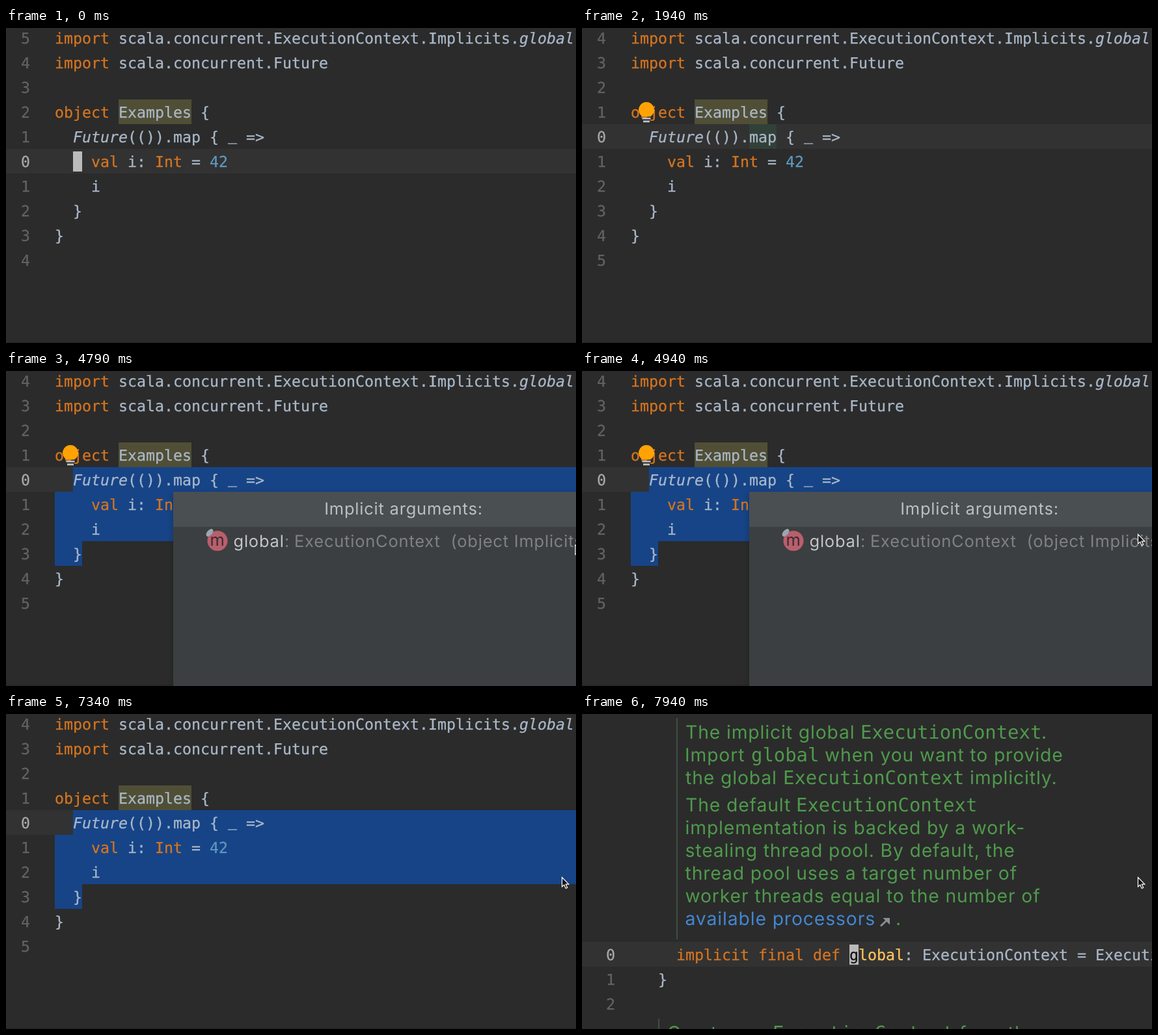
An HTML page that plays this animation: 876 px wide and 485 px high, repeating every 8000 ms.

```html
<!DOCTYPE html>
<html lang="en">
<head>
<meta charset="utf-8">
<title>Implicit arguments popup</title>
<style>
  html, body { margin: 0; width: 100%; height: 100%; overflow: hidden; background: #2b2b2b; }
  svg { display: block; width: 876px; height: 485px; }
  text { white-space: pre; text-rendering: geometricPrecision; }
  .code {
    font: 23.254px "DejaVu Sans Mono", monospace;
    color: #a9b7c8; fill: currentColor; stroke: currentColor; stroke-width: .3px;
  }
  .kw { color: #d47420; }
  .num { color: #5c99c0; }
  .it { font-style: italic; }
  .fn { color: #ffc45c; }
  .no { color: #606366; }
  .now { color: #a8a8a8; }
  .dark { color: #111; }
  .raw { color: #559a50; font-style: italic; }
  .ui { font: 25.5px Inter, sans-serif; letter-spacing: .78px; }
  .doc { font: 28.3px Inter, sans-serif; letter-spacing: .88px; fill: #4f9a4c; }
  .mono { font: 28.9px "DejaVu Sans Mono", monospace; fill: #4f9a4c; }
  .link { fill: #4287d2; }
  .popup { filter: drop-shadow(0 3px 4px rgba(0, 0, 0, .25)); }
</style>
</head>
<body>
<svg id="stage" viewBox="0 0 876 485"></svg>
<script>
const LOOP = 8000, CELL = 14, ROW = 38;
const stage = document.getElementById('stage');
const KEYWORDS = new Set('import object val Int implicit final def'.split(' '));

const SOURCE = [
  'import scala.concurrent.ExecutionContext.Implicits.^global',
  'import scala.concurrent.Future',
  '',
  'object Examples {',
  '  ^Future(()).map { _ =>',
  '    val i: Int = 42',
  '    i',
  '  }',
  '}',
  ''
];

const RAW_DOC = [
  '  object Implicits {',
  '    /**',
  '     * The implicit global `ExecutionContext`. Import `global` when',
  '     * `ExecutionContext` implicitly.',
  '     *',
  '     * The default `ExecutionContext` implementation is backed by a',
  '     * the thread pool uses a target number of worker threads equal',
  '     * [[available processors]].',
  '     */'
];

const rect = (x, y, w, h, fill) =>
  `<rect x="${x}" y="${y}" width="${w}" height="${h}" fill="${fill}"/>`;
const text = (x, y, str, cls, attrs = '') =>
  `<text x="${x}" y="${y}" class="${cls}" ${attrs}>${str.replace(/&/g, '&amp;').replace(/</g, '&lt;')}</text>`;

// "^word" is italic, "@word" is a declared name
function codeLine(x, y, line) {
  let col = 0, out = '';
  for (const token of line.match(/[\^@]?\w+|[^\w^@]+/g) || []) {
    const word = token.replace(/^[\^@]/, '');
    const cls = token[0] === '^' ? 'it' : token[0] === '@' ? 'fn'
      : KEYWORDS.has(word) ? 'kw' : /^\d/.test(word) ? 'num' : '';
    // the underscore sits close to the baseline
    out += text(x + col * CELL, word === '_' ? y - 3 : y, word, 'code ' + cls);
    col += word.length;
  }
  return out;
}

const lineNo = (x, y, n) => text(x, y, String(n), 'code ' + (n ? 'no' : 'now'));

const caret = (x, top, char = '', cls = '') =>
  rect(x, top + 4, CELL, 31, '#bbb') + text(x, top + 28, char, 'code dark ' + cls);

const pointer = (x, y) =>
  `<path d="M${x} ${y}v14.500l3.300-3 2.400 5.500 2.500-1.100-2.400-5.300h4.500z" fill="#111" stroke="#fff" stroke-width="1.200"/>`;

const bulb = () =>
  '<path d="M99 114a12 12 0 0 1 6 22.4h-12a12 12 0 0 1 6-22.4z" fill="#ffa305"/>' +
  rect(92.5, 138, 13, 2.5, '#c0c2c4') + rect(94, 142.5, 10, 2.8, '#c0c2c4');

function popup(active) {
  const main = active ? '#fff' : '#c2c4c5', faint = active ? '#fff' : '#7f8182';
  const item = (x, str, fill) => text(x, 271, str, 'ui', `fill="${fill}"`);
  return '<rect class="popup" x="257" y="186" width="640" height="320" fill="#3c3f41"/>' +
    rect(257, 186, 619, 54, '#4a4f51') +
    (active ? rect(257, 241, 619, 40, '#1a65d4') : '') +
    text(611, 221, 'Implicit arguments:', 'ui', 'fill="#bdbfc0" text-anchor="middle"') +
    `<circle cx="325" cy="261.5" r="15.5" fill="${active ? '#ab70b2' : '#b95f6c'}"/>` +
    text(325, 269, 'm', 'ui', 'fill="#3a2c32" text-anchor="middle"') +
    '<ellipse cx="313" cy="249" rx="7" ry="4" transform="rotate(-50 313 249)" fill="#9aa7b0"/>' +
    item(349.5, 'global', main) + item(428, ':', faint) +
    item(443, 'ExecutionContext', faint) + item(683.5, '(object Implicits', faint);
}

function selection() {
  const blue = '#174487';
  return rect(103, 148, 773, ROW, blue) + rect(75, 186, 801, 76, blue) +
    rect(75, 262, 42, ROW, blue);
}

function editor(t) {
  const current = t < 150 ? 5 : 4, selected = t >= 2540;
  let out = rect(0, current * ROW - 4, 876, ROW, '#323232');
  out += rect(173, 110, 112, ROW, '#504f36');
  if (t >= 450 && t < 1190) out += rect(103, 148, 84, ROW, '#314138');
  if (t >= 1190 && !selected) out += rect(257, 148, 42, ROW, '#314138');
  if (selected) out += selection();
  SOURCE.forEach((line, i) => {
    const y = i * ROW + 24;
    out += lineNo(23, y, Math.abs(i - current)) + codeLine(75, y, line);
  });
  if (t < 150) out += caret(103, 186);
  else if (t < 890) out += caret(103, 148, 'F', 'it');
  else if (t < 1940) out += caret(257, 148, 'm');
  if (t >= 1790 && t < 6140) out += bulb();
  out += rect(0, 483, 876, 2, '#262626');
  if (selected && t < 7340) out += popup(t >= 6140);
  if (t >= 4940) out += pointer(854.5, 251.5);
  else if (t >= 4790) out += pointer(875, 268);
  return out;
}

function renderedDoc() {
  const doc = (x, y, str, cls = '') => text(x, y, str, 'doc ' + cls);
  const mono = (x, y, str) => text(x, y, str, 'mono');
  const body = ['implementation is backed by a work-', 'stealing thread pool. By default, the',
    'thread pool uses a target number of', 'worker threads equal to the number of'];
  return rect(145, 6, 2, 341, '#3c5340') + rect(117, 469, 2, 16, '#3c5340') +
    doc(159, 38, 'The implicit global') + mono(428, 38, 'ExecutionContext') + doc(706, 38, '.') +
    doc(158, 73, 'Import') + mono(260, 73, 'global') + doc(373, 73, 'when you want to provide') +
    doc(159, 108, 'the global') + mono(309, 108, 'ExecutionContext') + doc(596, 108, 'implicitly.') +
    doc(159, 150, 'The default') + mono(329, 150, 'ExecutionContext') +
    body.map((str, i) => doc(158.5, 185 + 35 * i, str)).join('') +
    doc(158.5, 325, 'available processors', 'link') + doc(482, 325, '.') +
    '<path d="M459 326.500l9-8.500" stroke="#8b9095" stroke-width="3"/>' +
    '<path d="M462.500 314h10.500v10.500z" fill="#8b9095"/>' +
    doc(131, 501, 'Creates an') + mono(293, 501, 'ExecutionContext') + doc(580, 501, 'from the');
}

function rawDoc() {
  return RAW_DOC.map((line, i) => {
    const y = 37 + i * ROW;
    return lineNo(37, y, RAW_DOC.length - i) +
      (i ? text(89, y, line, 'code raw') : codeLine(89, y, line));
  }).join('') + text(117, 493, '/**', 'code raw') + lineNo(37, 493, 3);
}

function definition(t) {
  const name = t < 7940 ? 'global' : '@global';
  return rect(0, 351, 876, ROW, '#323232') +
    (t < 7640 ? rawDoc() : renderedDoc()) +
    lineNo(37, 379, 0) + lineNo(37, 417, 1) + lineNo(37, 455, 2) +
    codeLine(145, 379, `implicit final def ${name}: ExecutionContext = ExecutionContext`) +
    codeLine(117, 417, '}') +
    caret(411, 351, 'g') + pointer(854.5, 251.5);
}

let shown = '';
function draw(t) {
  const picture = rect(0, 0, 876, 485, '#2b2b2b') + (t < 7490 ? editor(t) : definition(t));
  if (picture !== shown) stage.innerHTML = shown = picture;
}

const start = performance.now();
function tick() {
  draw((performance.now() - start) % LOOP);
  requestAnimationFrame(tick);
}
tick();
</script>
</body>
</html>
```
